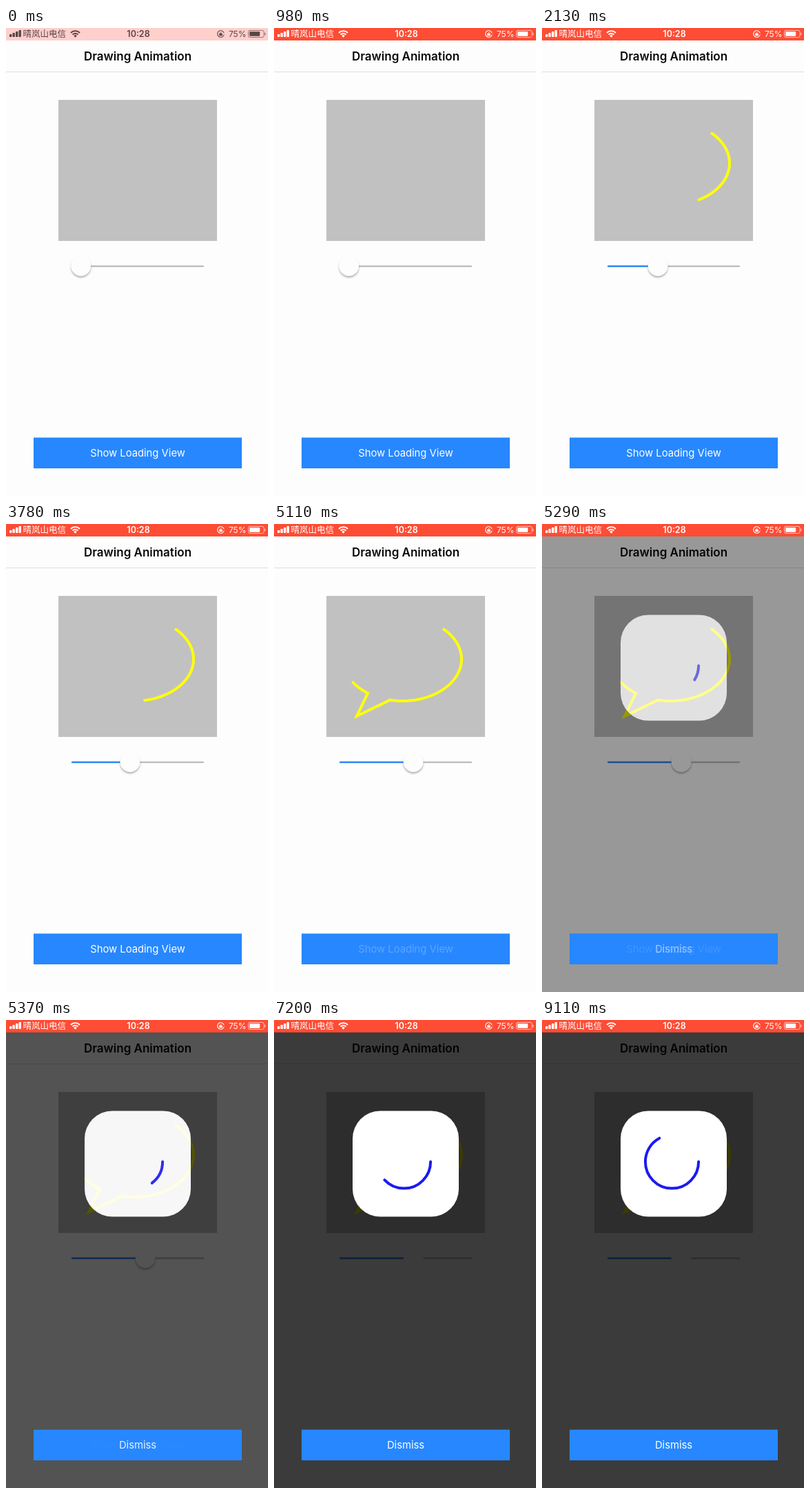
An HTML page with a canvas that plays this animation: 380 px wide and 677 px high, repeating every 9280 ms.

```html
<!DOCTYPE html>
<html lang="en">
<head>
<meta charset="utf-8">
<title>Drawing Animation</title>
<style>
html, body { margin: 0; width: 100%; height: 100%; overflow: hidden; background: #fdfdfd; }
canvas { position: absolute; left: 0; top: 0; width: 380px; height: 677px; }
</style>
</head>
<body>
<canvas id="page"></canvas>
<canvas id="loading"></canvas>
<script>
const W = 380, H = 677, LOOP = 9280, FRAME = 86.9;
const SANS = 'Inter, Roboto, sans-serif';
const page = layer('page'), loading = layer('loading');

function layer(id) {
  const el = document.getElementById(id), dpr = window.devicePixelRatio || 1;
  el.width = W * dpr;
  el.height = H * dpr;
  const ctx = el.getContext('2d');
  ctx.scale(dpr, dpr);
  return ctx;
}

const clamp = (x, a = 0, b = 1) => Math.min(b, Math.max(a, x));
const smooth = x => { x = clamp(x); return x * x * (3 - 2 * x); };
const mix = (a, b, p) => `rgb(${a.map((v, i) => Math.round(v + (b[i] - v) * p)).join()})`;

function snap(t) {
  const base = t >= 5110 ? 5110 : t >= 1790 ? 1790 : 810;
  const held = base + Math.floor((t - base + 10) / FRAME) * FRAME;
  return Math.min(held, 9110);
}

// Slider drag: time, value
const DRAG = [
  [1700, .015], [1850, .1], [1997, .236], [2137, .362], [2420, .7], [2700, .96], [2850, .98],
  [3150, .6], [3430, .22], [3530, .2], [3649, .288], [3789, .435], [4000, .56], [4340, .57]
];

function slope(i) {
  if (i === 0 || i === DRAG.length - 1) return 0;
  const [a, , b] = DRAG.slice(i - 1, i + 2);
  return (b[1] - a[1]) / (b[0] - a[0]);
}

function dragAt(t) {
  if (t <= DRAG[0][0]) return DRAG[0][1];
  const i = DRAG.findIndex(k => k[0] > t) - 1;
  if (i < 0) return DRAG[DRAG.length - 1][1];
  const [t0, v0] = DRAG[i], [t1, v1] = DRAG[i + 1];
  const d = t1 - t0, u = (t - t0) / d, w = 1 - u;
  return v0 * (1 + 2 * u) * w * w + slope(i) * d * u * w * w +
    v1 * u * u * (3 - 2 * u) - slope(i + 1) * d * u * u * w;
}

// Speech bubble outline
const bubble = [];
function addArc(from, to) {
  for (let i = 0; i <= 80; i++) {
    const a = from + (to - from) * i / 80;
    bubble.push([186 + 86 * Math.cos(a), 195.5 + 60.5 * Math.sin(a)]);
  }
}
addArc(-.795, 1.78);
bubble.push([120, 278]);
addArc(2.19, 5.65);

const gap = (a, b) => Math.hypot(b[0] - a[0], b[1] - a[1]);
const bubbleLength = bubble.reduce((sum, p, i) => i ? sum + gap(bubble[i - 1], p) : 0, 0);

function drawBubble(c, part) {
  if (part <= 0) return;
  let left = part * bubbleLength;
  c.beginPath();
  c.moveTo(...bubble[0]);
  for (let i = 1; i < bubble.length && left > 0; i++) {
    const a = bubble[i - 1], b = bubble[i], d = gap(a, b), u = d ? Math.min(1, left / d) : 1;
    c.lineTo(a[0] + (b[0] - a[0]) * u, a[1] + (b[1] - a[1]) * u);
    left -= d;
  }
  stroke(c, '#ffff0a', 4);
}

function stroke(c, color, width) {
  c.strokeStyle = color;
  c.lineWidth = width;
  c.lineCap = 'round';
  c.stroke();
}

function text(c, str, x, y, font, color, align = 'center') {
  c.font = font;
  c.fillStyle = color;
  c.textAlign = align;
  c.fillText(str, x, y);
}

function line(c, x0, x1, y, color, width) {
  c.beginPath();
  c.moveTo(x0, y);
  c.lineTo(x1, y);
  stroke(c, color, width);
}

function drawStatus(c, p) {
  const ink = mix([88, 70, 70], [255, 255, 255], p);
  c.fillStyle = mix([255, 207, 204], [255, 76, 52], p);
  c.fillRect(0, 0, W, 18);
  c.fillStyle = ink;
  for (let i = 0; i < 4; i++) {
    const h = 4 + i * 2;
    c.beginPath();
    c.roundRect(5 + i * 4.5, 13 - h, 3.4, h, .8);
    c.fill();
  }
  text(c, '晴岚山电信', 24.5, 13.2, '12.5px "Noto Sans CJK SC", "Noto Sans CJK", sans-serif', ink, 'left');

  for (const r of [5.6, 9.2]) {
    c.beginPath();
    c.arc(100.5, 13.5, r, -2.36, -.78);
    c.strokeStyle = ink;
    c.lineWidth = 2;
    c.lineCap = 'butt';
    c.stroke();
  }
  c.beginPath();
  c.moveTo(100.5, 13.8);
  c.arc(100.5, 13.5, 3.2, -2.36, -.78);
  c.fill();

  text(c, '10:28', 192, 13, `600 12.5px ${SANS}`, ink);
  text(c, '75%', 348.5, 13, `12px ${SANS}`, ink, 'right');

  c.beginPath();
  c.arc(311.5, 8.5, 4.8, .3, 5.9);
  stroke(c, ink, 1.1);
  c.fillRect(309.3, 8, 4.4, 3.2);
  c.beginPath();
  c.arc(311.5, 8, 1.4, Math.PI, 0);
  stroke(c, ink, .9);

  c.beginPath();
  c.roundRect(351.5, 3.5, 22.5, 10, 2.2);
  c.globalAlpha = .65;
  stroke(c, ink, 1);
  c.fillRect(375, 6.8, 1.3, 3.6);
  c.globalAlpha = 1;
  c.beginPath();
  c.roundRect(353.2, 5.2, 15, 6.6, 1);
  c.fill();
}

function drawSlider(c, value, shade) {
  const x = 108.7 + 163.8 * value, y = 344.7;
  line(c, 96, 286, y, '#b9b9b9', 2.2);
  if (x > 112) line(c, 96, x, y, '#2b86fb', 2.2);
  c.save();
  c.shadowColor = `rgba(0,0,0,${.34 * shade})`;
  c.shadowBlur = 3;
  c.shadowOffsetY = 2.2;
  c.fillStyle = '#fdfdfd';
  c.beginPath();
  c.arc(x, y - .4, 14.2, 0, 7);
  c.fill();
  c.restore();
  // The upper rim melts into the page.
  c.beginPath();
  c.arc(x, y - .4, 14.4, 0, 7);
  c.fillStyle = '#fdfdfd';
  c.fill();
}

function drawButton(c, label, alpha) {
  c.fillStyle = '#2787ff';
  c.fillRect(40, 592.5, 302, 44.5);
  text(c, label, 191, 620.3, `14.8px ${SANS}`, `rgba(255,255,255,${alpha})`);
}

function drawPage(c, t, now) {
  c.fillStyle = '#fdfdfd';
  c.fillRect(0, 0, W, H);
  c.fillStyle = '#dedede';
  c.fillRect(0, 63, W, 1);
  text(c, 'Drawing Animation', 191, 47, `600 17px ${SANS}`, '#0a0a0a');
  c.fillStyle = '#c1c1c1';
  c.fillRect(76, 104, 230, 204);
  const touched = now >= 1520;
  drawBubble(c, touched ? dragAt(t - 140) : 0);
  drawSlider(c, touched ? dragAt(t) : 0, 1 - smooth((t - 5370) / 250));
  drawButton(c, 'Show Loading View', now < 5110 ? 1 : .25);
  drawStatus(c, clamp((t - 810) / FRAME / 3 + 1 / 3));
}

function drawLoading(c, t) {
  const shown = t >= 5110 ? smooth((t - 5120) / 320) : 0;
  c.canvas.style.opacity = shown;
  c.clearRect(0, 0, W, H);
  if (!shown) return;
  c.fillStyle = 'rgba(0,0,0,.77)';
  c.fillRect(0, 18, W, H - 18);
  c.fillStyle = '#fff';
  c.beginPath();
  c.roundRect(114, 131.5, 154, 153, 40);
  c.fill();
  const turn = Math.max(0, t - 5153) / 1480 % 1;
  c.beginPath();
  c.arc(188.5, 205, 38.6, 0, turn * 2 * Math.PI);
  stroke(c, '#1b1bf0', 4);
  drawButton(c, 'Dismiss', 1);
}

const start = performance.now();
function tick() {
  const now = (performance.now() - start) % LOOP, t = snap(now);
  drawPage(page, t, now);
  drawLoading(loading, t);
  requestAnimationFrame(tick);
}
tick();
</script>
</body>
</html>
```
